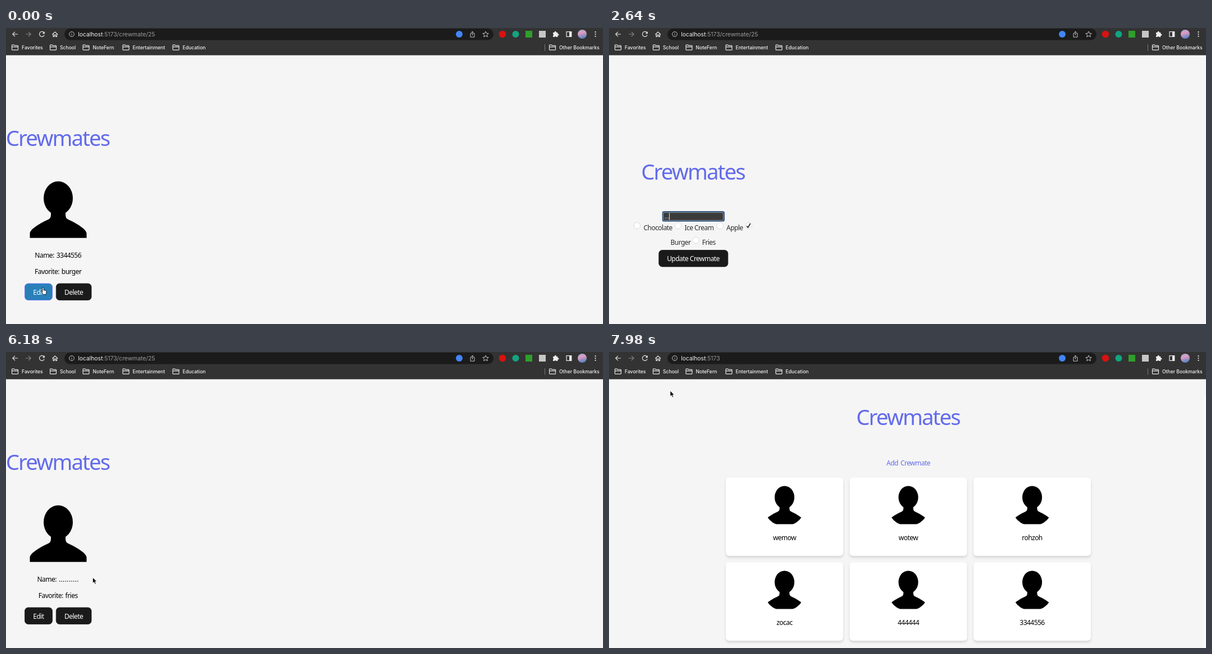
Animation of 1063x527 px, one loop 8 s. Source, as an HTML page:

```html
<!DOCTYPE html>
<html lang="en">
<head>
<meta charset="utf-8">
<title>Crewmates</title>
<style>
  html, body { margin: 0; width: 100%; height: 100%; overflow: hidden; background: #f5f5f5; }
  svg { display: block; width: 100vw; height: 100vh; }
  text { white-space: pre; }
  .page { font: 12px "Noto Sans", "Open Sans", sans-serif; letter-spacing: -.045em; }
  .mid, .title { text-anchor: middle; }
  .mid { word-spacing: .12em; }
  .title { font-size: 38.4px; letter-spacing: -.05em; fill: #636beb; }
  .link { fill: #636beb; }
  .label { fill: #2c2c2c; }
  .btn rect { fill: #1a1a1a; stroke: #1a1a1a; stroke-width: .8; }
  .btn.hover rect { fill: #2980b9; stroke: #646cff; }
  .btn text { fill: #fff; text-anchor: middle; }
  .field { font: 10px "Liberation Sans", Arial, sans-serif; letter-spacing: 0; fill: #fff; }
  .dots { letter-spacing: .38px; }
  .radio circle { fill: #fff; stroke: #d2d2d2; stroke-width: .8; }
  .tick { fill: none; stroke: #111; stroke-width: 1.5; }
  .card { fill: #fff; filter: drop-shadow(0 3px 2.2px rgba(0, 0, 0, .13)); }
  .marks { font: 500 8.6px Inter, Roboto, sans-serif; fill: #f2f2f2; }
  .url { font: 10.3px Inter, Roboto, sans-serif; fill: #9b9c9e; }
  .line { fill: none; stroke: #e6e6e6; stroke-width: 1.2; }
  .thin { stroke: #c4c4c4; stroke-width: 1; }
</style>
</head>
<body>
<svg viewBox="0 0 1063 527">
  <defs>
    <g id="person">
      <ellipse cy="-20.5" rx="26" ry="30"/>
      <path d="M-50.5 50.2V42C-50 34-30 23-17 17Q-13 15-13 9V0H13V9Q13 15 17 17C30 23 50 34 50.5 42V50.2Z"/>
    </g>
    <clipPath id="round"><circle r="55.5"/></clipPath>
    <path id="folder" class="line" d="M.5 8.6V1.3Q.5.5 1.3.5H4.2L5.4 1.7H10.7Q11.5 1.7 11.5 2.5V8.6Q11.5 9.4 10.7 9.4H1.3Q.5 9.4.5 8.6ZM.5 3.9H11.5"/>
    <path id="arrow" d="M0 0V10L2.3 7.9L4 11.6L5.7 10.9L4.1 7.3H7.1Z" stroke="#fff" stroke-width=".7"/>
    <path id="hand" d="M-1.2 7.2V.3Q-1.1-.8 0-.8T1.2.3V4L2.8 3.9L4.2 4.4L5.6 5Q6.2 5.4 6 7L5.2 9.6V11.6H-.2V10.3L-2.9 6.9Q-3.3 5.6-2.2 5.7Z" fill="#fff" stroke="#000" stroke-width=".8"/>
    <path id="beam" d="M-2-6Q0-6 0-5Q0-6 2-6M0-5V5M-2 6Q0 6 0 5Q0 6 2 6" fill="none" stroke="#111" stroke-width="1"/>
    <linearGradient id="photo" x2=".3" y2="1">
      <stop stop-color="#8fb4dc"/><stop offset=".45" stop-color="#e29ac0"/><stop offset="1" stop-color="#5b86c4"/>
    </linearGradient>
  </defs>

  <rect width="1063" height="527" fill="#f5f5f5"/>

  <g id="detail" class="page">
    <text class="title" x="92" y="209.5">Crewmates</text>
    <use href="#person" x="93" y="323.5"/>
    <text class="mid" id="name" x="92.7" y="409"></text>
    <text class="mid" id="food" x="92.7" y="438"></text>
    <g class="btn" id="edit"><rect x="33.5" y="455" width="49" height="29.5" rx="6"/><text x="58" y="474.5">Edit</text></g>
    <g class="btn"><rect x="89.3" y="455" width="62.7" height="29.5" rx="6"/><text x="120.6" y="474.5">Delete</text></g>
  </g>

  <g id="form" class="page">
    <text class="title" x="149.5" y="269.5">Crewmates</text>
    <rect x="96.3" y="328" width="108" height="15" fill="#3b3b3b" stroke="#777" stroke-width=".7"/>
    <g id="ring" fill="none">
      <rect x="95.6" y="327.2" width="109.3" height="16.4" rx="2" stroke="#17406f" stroke-width="1.7"/>
      <rect x="96.8" y="328.4" width="106.9" height="14" stroke="#e4ecf4" stroke-width=".5"/>
    </g>
    <rect id="select" y="329.2" height="12.4" fill="#41648c"/>
    <text id="field" class="field" x="98.8" y="339"></text>
    <rect id="caret" y="329.5" width=".9" height="12" fill="#fff"/>
    <g class="radio">
      <circle cx="50" cy="352" r="5.8"/><circle cx="123" cy="352" r="5.8"/><circle cx="197.5" cy="352" r="5.8"/>
      <circle cx="248.5" cy="352" r="5.8"/><circle cx="154.5" cy="378" r="5.8"/>
    </g>
    <path id="tick" class="tick" d="M-3.4.4L-1 3.2L3.2-4"/>
    <g class="label">
      <text x="61.5" y="360">Chocolate</text><text x="134.5" y="360">Ice Cream</text><text x="209" y="360">Apple</text>
      <text x="109.5" y="386">Burger</text><text x="165.7" y="386">Fries</text>
    </g>
    <g class="btn" id="update"><rect x="88.8" y="395.5" width="123" height="29.5" rx="6"/><text x="150" y="415">Update Crewmate</text></g>
  </g>

  <g id="home" class="page">
    <text class="title" x="532.5" y="159.5">Crewmates</text>
    <text class="link mid" x="533" y="231">Add Crewmate</text>
  </g>
  <rect id="bar" x="1059" y="49" width="4" height="478" fill="#fafafa"/>

  <g id="browser">
    <rect width="1063" height="48.5" fill="#333"/>
    <rect x="104" y="1" width="764" height="20.5" rx="10.2" fill="#1b1b1b"/>
    <path class="line" d="M21 11H12M16 6.8L11.8 11L16 15.2"/>
    <path class="line" d="M35 11H44M40 6.8L44.2 11L40 15.2" style="stroke:#858585"/>
    <path class="line" d="M67.6 8.2A4.5 4.5 0 1 0 68.2 12.5"/>
    <path d="M68.9 6V10.2H64.7Z" fill="#e6e6e6"/>
    <path class="line" d="M82.5 11.5L87.2 7L92 11.5M84 10.5V15.4H86V12.3H88.5V15.4H90.5V10.5"/>
    <circle class="line thin" cx="117" cy="11" r="4.4"/>
    <path d="M117 10.3V13.4M117 8.4V9.4" stroke="#aaa"/>
    <text class="url" x="128.3" y="14.8"><tspan fill="#f4f4f4">localhost</tspan><tspan id="path"></tspan></text>
    <circle cx="807" cy="11" r="6" fill="#4285f4"/>
    <path class="line thin" d="M829 9.5H827V16.2H834V9.5H832M830.5 13V6.3M828.2 8.4L830.5 6.1L832.8 8.4"/>
    <path class="line thin" d="M854 6L855.5 9.4L859.2 9.7L856.4 12.1L857.3 15.8L854 13.8L850.7 15.8L851.6 12.1L848.8 9.7L852.5 9.4Z"/>
    <circle cx="884" cy="11" r="6.2" fill="#d9120f"/>
    <circle cx="907.5" cy="11" r="6" fill="#12a580"/>
    <rect x="925" y="5" width="12" height="12" fill="#2f9e2b"/>
    <rect x="949" y="5" width="12" height="12" fill="#c6c6c6"/>
    <path d="M974 8H976.7A1.6 1.6 0 1 1 979.7 8H982.3V10.5A1.6 1.6 0 1 1 982.3 13.5V16H979.6A1.6 1.6 0 0 0 976.6 16H974V13.4A1.6 1.6 0 0 0 974 10.5Z" fill="#eee"/>
    <path class="line" d="M998 6.7H1006.8V15.3H998Z"/><path d="M1003 6.5H1007V15.5H1003Z" fill="#eee"/>
    <circle cx="1026" cy="11" r="8" fill="url(#photo)"/>
    <g fill="#eee"><circle cx="1049.5" cy="7.2" r="1.1"/><circle cx="1049.5" cy="11" r="1.1"/><circle cx="1049.5" cy="14.8" r="1.1"/></g>
    <path d="M959.5 29V40.5" stroke="#777"/>
    <g class="marks" id="marks"></g>
  </g>

  <circle id="press" r="15.8" fill="none" stroke="#111" stroke-width="1.2"/>
  <use id="ghost" href="#arrow"/>
  <use id="mouse" href="#arrow"/>
</svg>

<script>
const $ = id => document.getElementById(id);
const show = (id, on) => { $(id).style.display = on ? "" : "none"; };
const set = (id, text) => { if ($(id).textContent !== text) $(id).textContent = text; };
const move = (id, x, y) => $(id).setAttribute("transform", `translate(${x} ${y})`);
const ease = u => { u = Math.min(1, Math.max(0, u)); return u * u * (3 - 2 * u); };
const within = (t, a, b) => t >= a && t < b;

const LOOP = 8000, OLD_NAME = "3344556";

const bookmarks = [[10, "Favorites"], [78, "School"], [136.5, "NoteFern"], [207.5, "Entertainment"],
  [296.5, "Education"], [967, "Other Bookmarks"]];
$("marks").innerHTML = bookmarks.map(([x, label]) =>
  `<use href="#folder" x="${x}" y="29.7"/><text x="${x + 18}" y="37.8">${label}</text>`).join("");

const crew = ["wemow", "wotew", "rohzoh", "zocac", "444444", OLD_NAME];
$("home").innerHTML += crew.map((name, i) => {
  const x = 208 + i % 3 * 220.5, y = 253 + Math.floor(i / 3) * 151;
  return `<rect class="card" x="${x}" y="${y}" width="209" height="139.5" rx="6"/>
    <g transform="translate(${x + 104.5} ${y + 49}) scale(.675)"><g clip-path="url(#round)"><use href="#person"/></g></g>
    <text class="mid" x="${x + 104.5}" y="${y + 111.3}">${name}</text>`;
}).join("");

// time, x, y of the pointer tip
const route = [[0, 66, 463], [540, 65, 463], [1020, 160, 335], [1470, 160, 336], [1890, 65.5, 333.5],
  [3960, 65.5, 333], [4500, 155, 381], [4890, 155, 381], [5000, 155.5, 399], [5100, 154.5, 402],
  [6170, 154.5, 402], [6570, 128, 193], [7280, 128, 193], [7350, 142, 203], [7650, 142, 203], [7975, 109, 69]];
const presses = [[30, 240], [1440, 1980], [4530, 4650], [5130, 5370], [6600, 6840]];
const keys = [2400, 2550, 2640, 2790, 2910, 3030, 3150, 3270, 3420, 3510];

function pointer(t) {
  const i = route.findIndex(p => p[0] > t);
  if (i < 0) return route[route.length - 1].slice(1);
  const [a, ax, ay] = route[i - 1], [b, bx, by] = route[i];
  const u = ease((t - a) / (b - a));
  return [ax + (bx - ax) * u, ay + (by - ay) * u];
}

function draw(t) {
  const page = t < 150 ? "detail" : t < 5250 ? "form" : t < 6720 ? "detail" : "home";
  for (const id of ["detail", "form", "home"]) show(id, id === page);
  show("bar", page === "home");
  set("path", page === "home" ? ":5173" : ":5173/crewmate/25");

  const [x, y] = pointer(t);
  const over = (p, l, top, r, b) => page === p && x > l && x < r && y > top && y < b;
  const onEdit = over("detail", 33, 454, 83, 485);
  const onUpdate = over("form", 88, 395, 212, 425);
  const onTitle = over("detail", 0, 178, 186, 215);
  $("edit").classList.toggle("hover", onEdit);
  $("update").classList.toggle("hover", onUpdate);

  if (page === "detail") {
    const first = t < 150;
    const html = "Name: " + (first ? OLD_NAME : '<tspan class="dots">..........</tspan>');
    if ($("name").innerHTML !== html) $("name").innerHTML = html;
    set("food", "Favorite: " + (first ? "burger" : "fries"));
  } else if (page === "form") {
    const typed = keys.filter(k => k <= t).length;
    set("field", t < 2370 ? OLD_NAME : ".".repeat(typed));
    show("ring", within(t, 1440, 4530));
    show("caret", within(t, 2370, 3960));
    $("caret").setAttribute("x", 98.8 + typed * 2.78);
    const left = Math.min(138, Math.max(98.4, x));
    show("select", within(t, 1440, 2370));
    $("select").setAttribute("x", left);
    $("select").setAttribute("width", 138 - left);
    if (t < 4560) move("tick", 248.5, 352); else move("tick", 154.5, 378);
  } else {
    const scroll = 29.5 * ease((t - 7590) / 200);
    move("home", 0, -scroll);
    $("bar").setAttribute("y", 49 + scroll);
  }

  const kind = onEdit || onUpdate || onTitle ? "#hand" : over("form", 95, 327, 205, 344) ? "#beam" : "#arrow";
  $("mouse").setAttribute("href", kind);
  move("mouse", x, y);
  show("mouse", !within(t, 2370, 3960));
  move("ghost", x + 6, y + 1);
  show("ghost", within(t, 3960, 3990));
  move("press", x, y);
  show("press", presses.some(([a, b]) => within(t, a, b)));
}

function tick() {
  draw(performance.now() % LOOP);
  requestAnimationFrame(tick);
}
tick();
</script>
</body>
</html>
```
